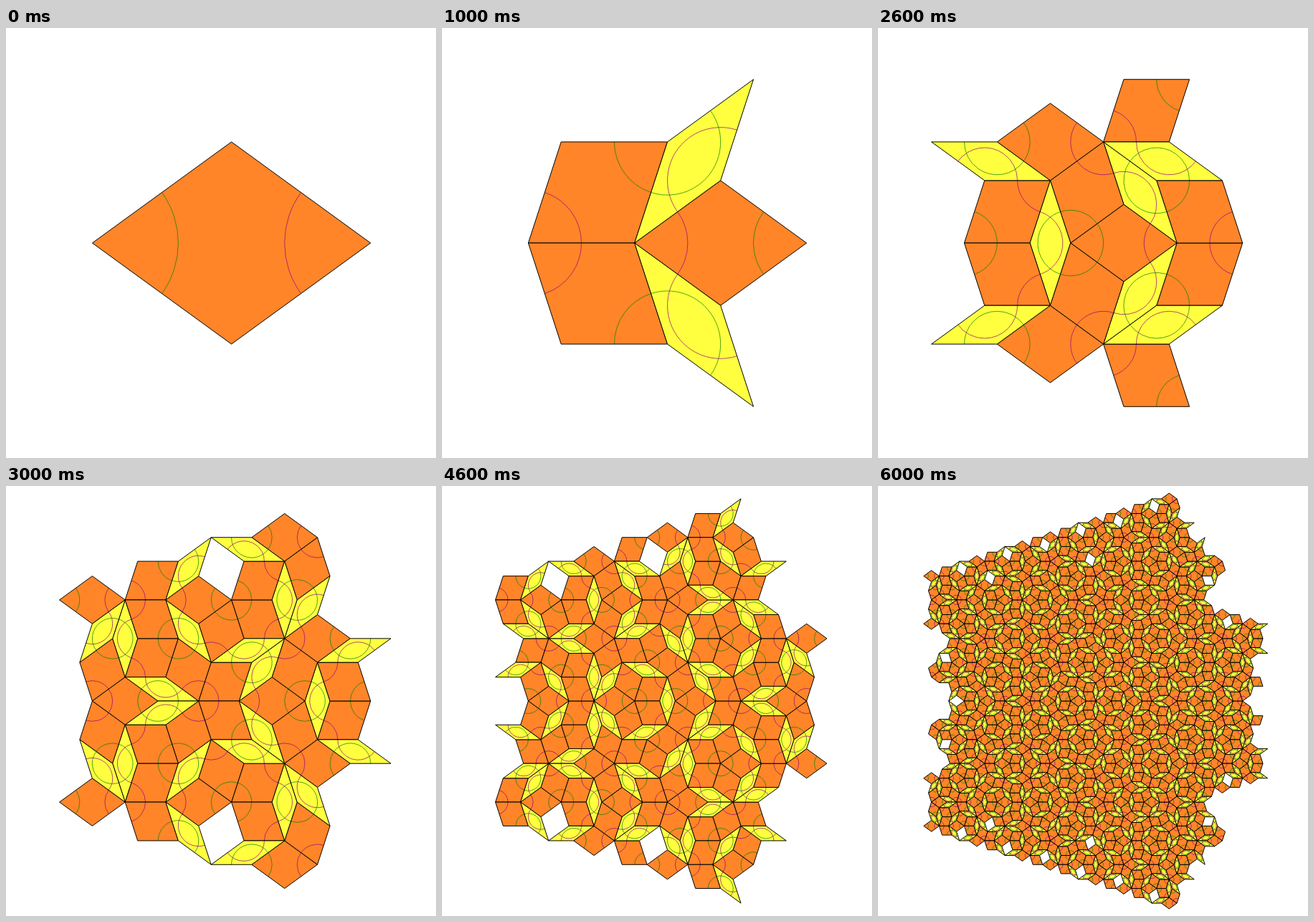
Animation, 600 px wide and 600 px high, one loop 7000 ms. Source, as an HTML page with a canvas:

```html
<!DOCTYPE html>
<html lang="en">
<head>
<meta charset="utf-8">
<title>Rhomb tiling</title>
<style>
  html, body { margin: 0; width: 100%; height: 100%; overflow: hidden; background: #fff; }
  canvas { display: block; }
</style>
</head>
<body>
<canvas id="stage" width="600" height="600"></canvas>
<script>
const ctx = document.getElementById('stage').getContext('2d');
const PHI = (1 + Math.sqrt(5)) / 2;
const CUT = 1 / (PHI * PHI);
const STEP = 1000, LEVELS = 7;
const GREEN = '#008000', PURPLE = '#900080';

const lerp = (p, q, t) => [p[0] + (q[0] - p[0]) * t, p[1] + (q[1] - p[1]) * t];

// A rhomb is given by its two arc corners: g (green arc) and m (purple arc).
function rhomb(thick, g, m) {
  const half = Math.PI / 5 * (thick ? 1 : 2);
  const mid = lerp(g, m, 0.5), k = Math.tan(half) / 2;
  const dx = (m[0] - g[0]) * k, dy = (m[1] - g[1]) * k;
  return {
    thick, g, m, half, mid,
    c: [mid[0] + dy, mid[1] - dx],
    d: [mid[0] - dy, mid[1] + dx],
    side: Math.hypot(m[0] - g[0], m[1] - g[1]) / 2 / Math.cos(half)
  };
}

function split({ thick, g, m, c, d }) {
  if (!thick) {
    return [c, d].flatMap(p => [rhomb(true, p, g), rhomb(false, m, lerp(m, p, CUT))]);
  }
  return [
    rhomb(true, m, lerp(g, m, CUT)),
    ...[c, d].flatMap(p => [rhomb(true, p, g), rhomb(false, p, lerp(p, m, CUT))])
  ];
}

// Neighbouring parents share children, so keep one rhomb per centre.
function refine(tiles) {
  const unique = new Map();
  for (const t of tiles.flatMap(split)) {
    const key = t.mid.map(Math.round).join();
    if (!unique.has(key)) unique.set(key, t);
  }
  return [...unique.values()];
}

function drawArc(t, from, to, color) {
  const dir = Math.atan2(to[1] - from[1], to[0] - from[0]);
  ctx.beginPath();
  ctx.arc(from[0], from[1], t.side / 2, dir - t.half, dir + t.half);
  ctx.lineWidth = 0.7;
  ctx.strokeStyle = color;
  ctx.stroke();
}

function drawTile(t) {
  const outline = new Path2D();
  [t.g, t.c, t.m, t.d].forEach(p => outline.lineTo(p[0], p[1]));
  outline.closePath();
  ctx.fillStyle = t.thick ? '#ff8528' : '#ffff40';
  ctx.fill(outline);
  drawArc(t, t.g, t.m, GREEN);
  drawArc(t, t.m, t.g, PURPLE);
  ctx.lineWidth = 1;
  ctx.strokeStyle = '#000';
  ctx.stroke(outline);
}

const reach = 240 * Math.cos(Math.PI / 5), cx = 314.55;
const levels = [[rhomb(true, [cx - reach, 300], [cx + reach, 300])]];
while (levels.length < LEVELS) levels.push(refine(levels[levels.length - 1]));

let shown = -1;
const start = performance.now();

function tick() {
  const level = Math.floor((performance.now() - start) / STEP) % LEVELS;
  if (level !== shown) {
    shown = level;
    ctx.fillStyle = '#fff';
    ctx.fillRect(0, 0, 600, 600);
    levels[level].forEach(drawTile);
  }
  requestAnimationFrame(tick);
}
tick();
</script>
</body>
</html>
```
